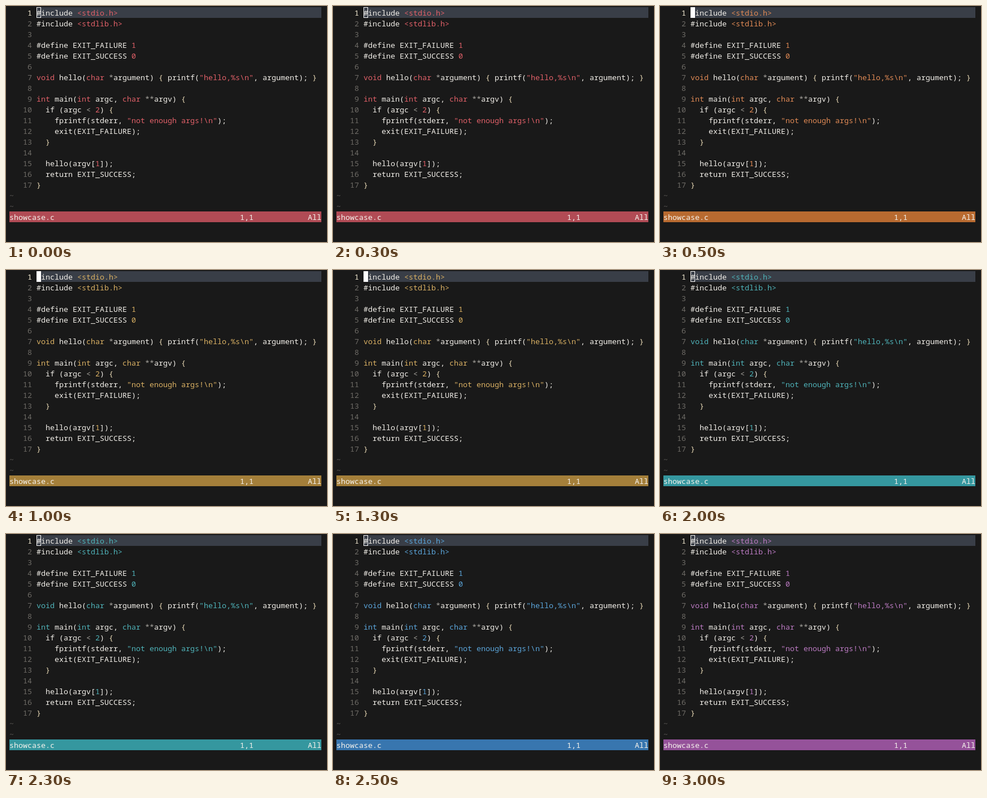
Recreate the animation shown at these times as an HTML page with a canvas. Size 568 by 417 pixels, loop 3500 ms.

```html
<!DOCTYPE html>
<html lang="en">
<head>
<meta charset="utf-8">
<style>
html, body { margin: 0; height: 100%; overflow: hidden; background: #191919; }
canvas { display: block; }
</style>
</head>
<body>
<canvas id="editor" width="568" height="417"></canvas>
<script>
const ctx = document.getElementById('editor').getContext('2d');
const LEFT = 6, TOP = 2, CELL = 8, ROW = 19, COLS = 69, GUTTER = 6, STATUS_ROW = 19;
const STEP = 500;

// accent text, status bar, filled cursor
const themes = [
  ['#e06068', '#b14b55', false],
  ['#e08a55', '#b86a30', true],
  ['#d9b063', '#a47f3a', true],
  ['#8fbb6a', '#67944a', false],
  ['#4fb3b9', '#35979f', false],
  ['#5ba5da', '#3876af', false],
  ['#bb7ac2', '#95529a', false],
];

const source = String.raw`#include <stdio.h>
#include <stdlib.h>

#define EXIT_FAILURE 1
#define EXIT_SUCCESS 0

void hello(char *argument) { printf("hello,%s\n", argument); }

int main(int argc, char **argv) {
  if (argc < 2) {
    fprintf(stderr, "not enough args!\n");
    exit(EXIT_FAILURE);
  }

  hello(argv[1]);
  return EXIT_SUCCESS;
}`.split('\n');

const TOKEN = /(".*?"|<std.*?>|\b(?:void|char|int|\d)\b)|(\*+|<)|([{}])|[^\s{}*<"()\[\];,]+|\S/g;

function rect(col, row, cols, color) {
  ctx.fillStyle = color;
  ctx.fillRect(LEFT + col * CELL, TOP + row * ROW, cols * CELL, ROW);
}

function text(str, col, row, color) {
  ctx.fillStyle = color;
  ctx.fillText(str, LEFT + col * CELL, TOP + row * ROW + 15);
}

function draw([accent, bar, filled]) {
  ctx.fillStyle = '#191919';
  ctx.fillRect(0, 0, 568, 417);
  ctx.font = '13.3333px "Noto Sans Mono", monospace';

  rect(GUTTER, 0, COLS - GUTTER, '#393e47');
  source.forEach((line, row) => {
    text(String(row + 1).padStart(5), 0, row, row ? '#6e6b66' : '#f0e8d0');
    for (const m of line.matchAll(TOKEN)) {
      const color = m[1] ? accent : m[2] ? '#a9a6a0' : m[3] ? '#ecdcb8' : '#f2efe9';
      text(m[0], GUTTER + m.index, row, color);
    }
  });

  if (filled) {
    rect(GUTTER, 0, 1, '#fff');
  } else {
    ctx.strokeStyle = '#fff';
    ctx.strokeRect(LEFT + GUTTER * CELL + .5, TOP + .5, CELL - 1, ROW - 1);
  }

  text('~', 0, 17, '#5c5a57');
  text('~', 0, 18, '#5c5a57');
  rect(0, STATUS_ROW, COLS, bar);
  text('showcase.c', 0, STATUS_ROW, '#f5f2ec');
  text('1,1', 51, STATUS_ROW, '#f5f2ec');
  text('All', 66, STATUS_ROW, '#f5f2ec');
}

function tick() {
  draw(themes[Math.floor(performance.now() / STEP) % themes.length]);
  requestAnimationFrame(tick);
}
tick();
</script>
</body>
</html>
```
